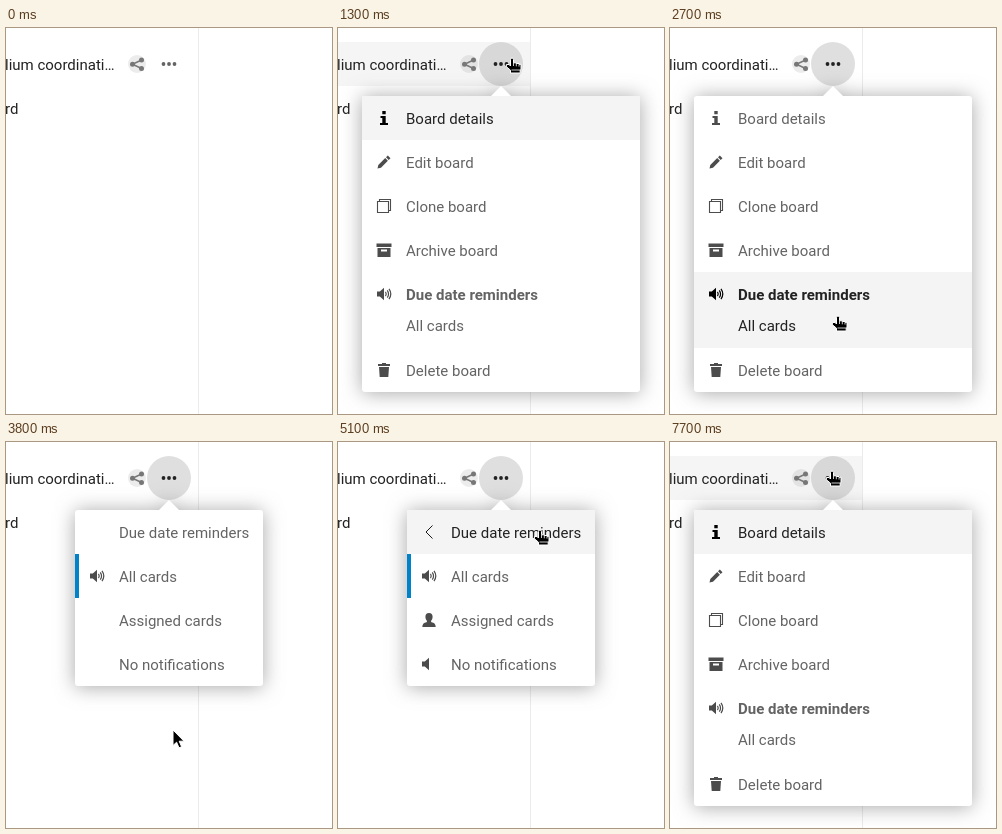
Recreate the animation shown at these times as an HTML page. Size 326x386 px, loop 8000 ms.

```html
<!DOCTYPE html>
<html lang="en">
<head>
<meta charset="utf-8">
<title>Board menu</title>
<style>
  html, body { margin: 0; width: 100%; height: 100%; overflow: hidden; background: #fff; }
  body { position: relative; font: 15px/44px Roboto, Arial, sans-serif; color: #222; }
  .abs, .item, .entry, .menu, .cursor { position: absolute; white-space: nowrap; }
  .entry { left: 0; width: 192px; height: 44px; }
  .entry.on { background: #f5f5f5; }
  .entry span { position: absolute; left: -1px; top: 1px; }
  .divider { left: 192px; top: 0; width: 1px; height: 100%; background: #ebebeb; }
  .menu { top: 68px; background: #fff; border-radius: 3px; filter: drop-shadow(0 1px 10px rgba(77, 77, 77, .5)); }
  .tip { top: -10px; border: 10px solid transparent; border-top: 0; border-bottom-color: #fff; }
  .item { left: 0; right: 0; }
  .item.on { background: #f4f4f4; }
  .item > * { opacity: .7; }
  .item.on > * { opacity: 1; }
  .item span { position: absolute; left: 44px; top: 1px; }
  .item .sub { top: 32px; }
  .item svg { position: absolute; left: 14px; top: 14px; width: 16px; height: 16px; overflow: visible; }
  .item.picked { box-shadow: inset 4px 0 #0082c9; }
  b { font-weight: 700; }
  .hide { display: none; }
  .cursor { left: 0; top: 0; width: 24px; height: 24px; overflow: visible; }
</style>
</head>
<body>
<div class="entry" id="entry" style="top:14px"><span>lium coordinati…</span></div>
<div class="entry" style="top:58px"><span>rd</span></div>
<div class="abs divider"></div>
<svg class="abs" style="left:0;top:0" width="192" height="60">
  <circle cx="131" cy="36" r="9" fill="rgb(127,127,127)" fill-opacity=".15"/>
  <g fill="#777" stroke="#777">
    <path d="M135.5 32 126.5 36.3 135.5 40.5" fill="none" stroke-width="1.5"/>
    <g stroke="none"><circle cx="126.5" cy="36.3" r="2.5"/><circle cx="135.5" cy="32" r="2.5"/><circle cx="135.5" cy="40.5" r="2.5"/></g>
  </g>
  <circle id="halo" cx="163" cy="36" r="22" fill="rgb(127,127,127)"/>
  <g id="dots"><circle cx="157.5" cy="36" r="1.9"/><circle cx="163" cy="36" r="1.9"/><circle cx="168.5" cy="36" r="1.9"/></g>
</svg>
<div class="menu" id="main" style="width:278px;height:296px"></div>
<div class="menu" id="sub" style="left:69px;width:188px;height:176px"></div>
<svg class="cursor" id="arrow">
  <path d="M0 0V15.5L3.6 12.2 6 17.8 8.6 16.7 6.2 11.2H11Z" fill="#000" stroke="#fff"/>
</svg>
<svg class="cursor" id="hand">
  <path d="M-.5 1.5Q-.5 0 1 0T2.5 1.5V4.8H5.3V5.5H8V6.3H10V11.2L9.2 12V15H-.5V12.2L-4.6 8.8V6.5H-2L-.5 8Z" fill="#000" stroke="#fff"/>
  <path d="M2.5 5V8M5.3 5.6V8.3M8 6.4V8.6M.5 12H9" fill="none" stroke="#fff" stroke-width=".8"/>
</svg>
<script>
const $ = id => document.getElementById(id);
const speaker = '<path d="M1 5.5H3.8L8 1.8v12.4L3.8 10.5H1z"/>';
const line = (d, w) => `<path d="${d}" fill="none" stroke="#000" stroke-width="${w}"/>`;
const icons = {
  info: '<path d="M6.3 1h3.4v3.2H6.3zM4.5 6h5.2v7H12v2H4v-2h2.3V8H4.5z"/>',
  edit: '<path d="M11.8 1.5 14.5 4.2 12.7 6 10 3.3zM9.2 4.1 11.9 6.8 5 13.7 1.5 14.5 2.3 11z"/>',
  clone: line('M1.5 3.5h11v11h-11zM3.5 3.5v-2h11v11h-2', 1.1),
  archive: '<path d="M.5 1.5h15v3.5H.5zM1.5 6h13v9h-13zM5 7.5v2h6v-2z" fill-rule="evenodd"/>',
  sound: speaker + line('M9.5 5.8Q11 8 9.5 10.2M11.3 4.3Q13.8 8 11.3 11.7M13 2.9Q16.6 8 13 13.1', 1.2),
  trash: '<path d="M6 1h4v1h4v2H2V2h4zM3 5h10l-.7 10H3.7z"/>',
  back: line('M11.5 1.5 5 8l6.5 6.5', .9),
  person: '<path d="M8 1c2.5 0 3.6 1.6 3.6 3.8S10.6 8.2 9.9 9.2q.1 1 2.3 1.5 2.3.7 2.5 4.3H1.3q.2-3.6 2.5-4.3 2.2-.5 2.3-1.5C5.4 8.2 4.4 7 4.4 4.8S5.5 1 8 1z"/>',
  mute: speaker
};

// rows: [icon, label, top, height, sub label]
const mainRows = [
  ['info', 'Board details', 0, 44],
  ['edit', 'Edit board', 44, 44],
  ['clone', 'Clone board', 88, 44],
  ['archive', 'Archive board', 132, 44],
  ['sound', '<b>Due date reminders</b>', 176, 76, 'All cards'],
  ['trash', 'Delete board', 252, 44]
];
const subRows = [
  ['back', 'Due date reminders', 0, 44],
  ['sound', 'All cards', 44, 44],
  ['person', 'Assigned cards', 88, 44],
  ['mute', 'No notifications', 132, 44]
];

function build(menu, rows) {
  menu.innerHTML = '<div class="abs tip"></div>' + rows.map(([icon, label, top, h, sub]) =>
    `<div class="item" style="top:${top}px;height:${h}px"><svg viewBox="0 0 16 16">${icons[icon]}</svg>` +
    `<span>${label}</span>${sub ? `<span class="sub">${sub}</span>` : ''}</div>`).join('');
  return [...menu.querySelectorAll('.item')];
}
const mainItems = build($('main'), mainRows);
const subItems = build($('sub'), subRows);
subItems[1].classList.add('picked');

// pointer path: [ms, x, y]
const path = [
  [400, 186, 8], [500, 183, 18], [600, 177, 26], [700, 173, 30],
  [1600, 173, 30], [2500, 167, 262], [2600, 167, 279], [2700, 167, 288],
  [4200, 167, 288], [5100, 201, 88], [7000, 201, 88], [7700, 161, 29]
];

function pointer(t) {
  const i = path.findIndex(p => p[0] > t);
  if (i < 0) return path[path.length - 1].slice(1);
  const [t0, x0, y0] = path[i - 1], [t1, x1, y1] = path[i];
  let k = (t - t0) / (t1 - t0);
  k = k * k * (3 - 2 * k);
  return [x0 + (x1 - x0) * k, y0 + (y1 - y0) * k].map(Math.round);
}

const show = (el, on) => el.classList.toggle('hide', !on);
const rowAt = (rows, y) => rows.findIndex(r => y >= 68 + r[2] && y < 68 + r[2] + r[3]);
const mark = (items, n) => items.forEach((el, i) => el.classList.toggle('on', i === n));

function render(ms) {
  const t = Math.floor(ms / 100) * 100;
  const seen = t >= 400;
  const [x, y] = seen ? pointer(t) : [-50, -50];
  const subOpen = t >= 3800 && t < 6400;
  const mainOpen = t >= 1200 && !subOpen;
  const open = mainOpen || subOpen;
  const onEntry = y >= 14 && y < 58;

  $('entry').classList.toggle('on', onEntry);
  const lit = open || onEntry;
  $('halo').setAttribute('fill-opacity', open ? .25 : onEntry ? .2 : 0);
  $('dots').setAttribute('fill', lit ? '#222' : '#646464');

  show($('main'), mainOpen);
  show($('sub'), subOpen);
  const left = t >= 6400 && t < 6500 ? 69 : 24;
  $('main').style.left = left + 'px';
  $('main').firstChild.style.left = 153 - left + 'px';
  $('sub').firstChild.style.left = '84px';

  // the first row keeps focus until another one is hovered
  let row = rowAt(mainRows, y);
  if (row < 0 && t >= 1300) row = 0;
  mark(mainItems, row);
  mark(subItems, rowAt(subRows, y));
  subItems.forEach((el, i) => {
    el.firstChild.style.visibility = i === 1 || t >= 3900 ? '' : 'hidden';
  });

  const pointing = onEntry || (open && y < (subOpen ? 244 : 364));
  show($('arrow'), seen && !pointing);
  show($('hand'), seen && pointing);
  $('arrow').style.transform = $('hand').style.transform = `translate(${x}px, ${y}px)`;
}

const start = performance.now();
function frame() {
  render((performance.now() - start) % 8000);
  requestAnimationFrame(frame);
}
render(0);
requestAnimationFrame(frame);
</script>
</body>
</html>
```
